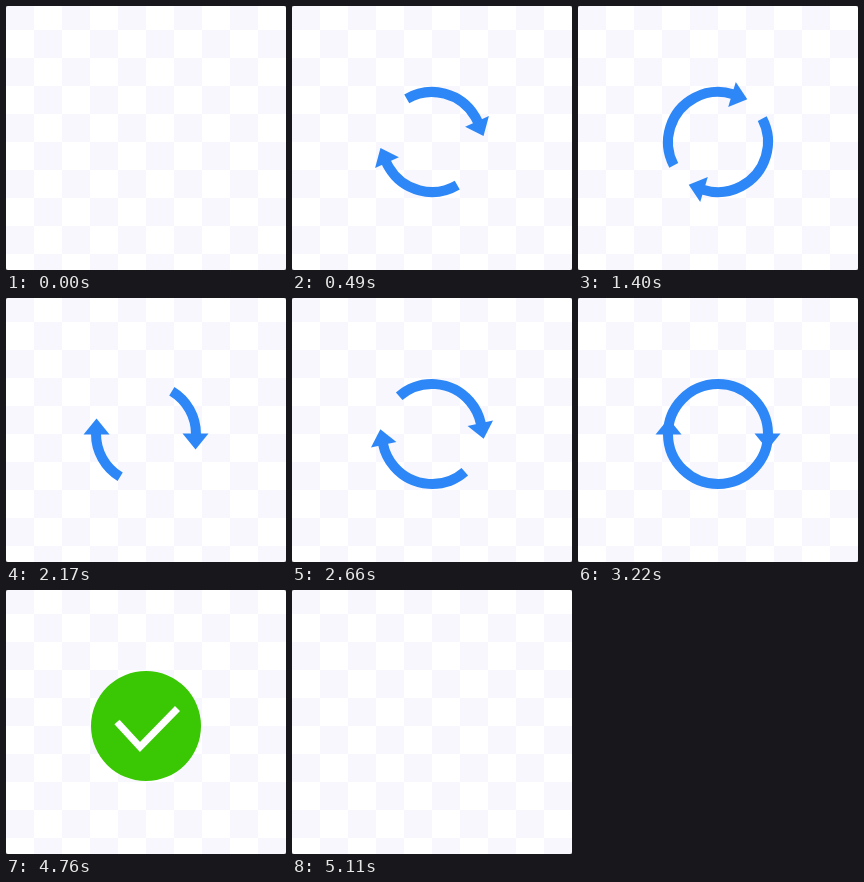
An HTML page with a canvas that plays this animation: 280 px wide and 264 px high, repeating every 5180 ms.

```html
<!DOCTYPE html>
<html lang="en">
<head>
<meta charset="utf-8">
<title>Sync to success</title>
<style>
  html, body { margin: 0; width: 100%; height: 100%; overflow: hidden; background: #666; }
  canvas { display: block; border-radius: 2px; }
</style>
</head>
<body>
<canvas width="280" height="264"></canvas>
<script>
const canvas = document.querySelector('canvas');
const ctx = canvas.getContext('2d');
const LOOP = 5180, STEP = 70;
const CX = 140, CY = 136, RADIUS = 50, STROKE = 10, CELL = 28;
const BLUE = [46, 135, 247], GREEN = [59, 200, 4];

const progress = (t, from, to) => Math.min(1, Math.max(0, (t - from) / (to - from)));
const smooth = u => u * u * (3 - 2 * u);
const linear = u => u;
const mix = (a, b, u) => a + (b - a) * u;
const rad = deg => deg * Math.PI / 180;

// Keys are [time, value] pairs; the value is held before the first and after the last.
function track(t, keys, ease) {
  let value = keys[0][1];
  for (let i = 1; i < keys.length; i++) {
    const [t0, v0] = keys[i - 1], [t1, v1] = keys[i];
    if (t >= t0) value = mix(v0, v1, ease(progress(t, t0, t1)));
  }
  return value;
}

// Leading angle and length of each arc, in degrees.
const headAngle = t => track(t, [[140, -144], [490, -24], [1400, 287], [2170, 540], [3220, 900], [3500, 996]], linear);
const arcLength = t => track(t, [[140, 44], [950, 174], [2100, 57], [3220, 180]], smooth);

function drawBoard() {
  ctx.fillStyle = '#fff';
  ctx.fillRect(0, 0, 280, 264);
  ctx.fillStyle = '#f7f7fd';
  for (let row = 0; row < 10; row++)
    for (let col = row % 2; col < 10; col += 2)
      ctx.fillRect(col * CELL, row * CELL - 4, CELL, CELL);
}

function drawArrow(angle, length, headSize) {
  ctx.save();
  ctx.rotate(rad(angle));
  ctx.beginPath();
  ctx.arc(0, 0, RADIUS, rad(-length - 0.5), rad(0.5));
  ctx.stroke();
  ctx.translate(RADIUS - 0.5, 0);
  ctx.scale(headSize, headSize);
  ctx.beginPath();
  ctx.moveTo(-13, -0.5);
  ctx.lineTo(13, -0.5);
  ctx.lineTo(0, 15.5);
  ctx.fill();
  ctx.restore();
}

function drawSync(t) {
  ctx.globalAlpha = progress(t, 70, 210);
  ctx.strokeStyle = ctx.fillStyle = `rgb(${BLUE})`;
  ctx.lineWidth = STROKE;
  const headSize = 1 - progress(t, 3220, 3430);
  for (const turn of [0, 180]) drawArrow(headAngle(t) + turn, arcLength(t), headSize);
}

function drawSuccess(t) {
  ctx.globalAlpha = 1 - progress(t, 4830, 5110);
  const pulse = 1 + 0.09 * Math.sin(Math.PI * progress(t, 3990, 4410));
  ctx.scale(pulse, pulse);

  // The ring turns green and thickens inward until it is a disc.
  const fill = smooth(progress(t, 3430, 3990));
  const outer = RADIUS + STROKE / 2;
  const inner = mix(RADIUS - STROKE / 2, 0, fill);
  ctx.fillStyle = `rgb(${BLUE.map((c, i) => Math.round(mix(c, GREEN[i], fill)))})`;
  ctx.beginPath();
  ctx.arc(0, 0, outer, 0, rad(360));
  ctx.arc(0, 0, inner, 0, rad(360), true);
  ctx.fill('evenodd');

  const drawn = smooth(progress(t, 3990, 4340));
  if (!drawn) return;
  ctx.strokeStyle = '#fff';
  ctx.lineWidth = 7;
  ctx.setLineDash([88 * drawn, 100]);
  ctx.beginPath();
  ctx.moveTo(-29, -4);
  ctx.lineTo(-6, 21);
  ctx.lineTo(31.5, -17.5);
  ctx.stroke();
}

function render(t) {
  drawBoard();
  if (t < 140) return;
  ctx.save();
  ctx.translate(CX, CY);
  (t < 3500 ? drawSync : drawSuccess)(t);
  ctx.restore();
}

function frame() {
  const t = performance.now() % LOOP;
  render(Math.floor(t / STEP) * STEP);
  requestAnimationFrame(frame);
}
frame();
</script>
</body>
</html>
```
